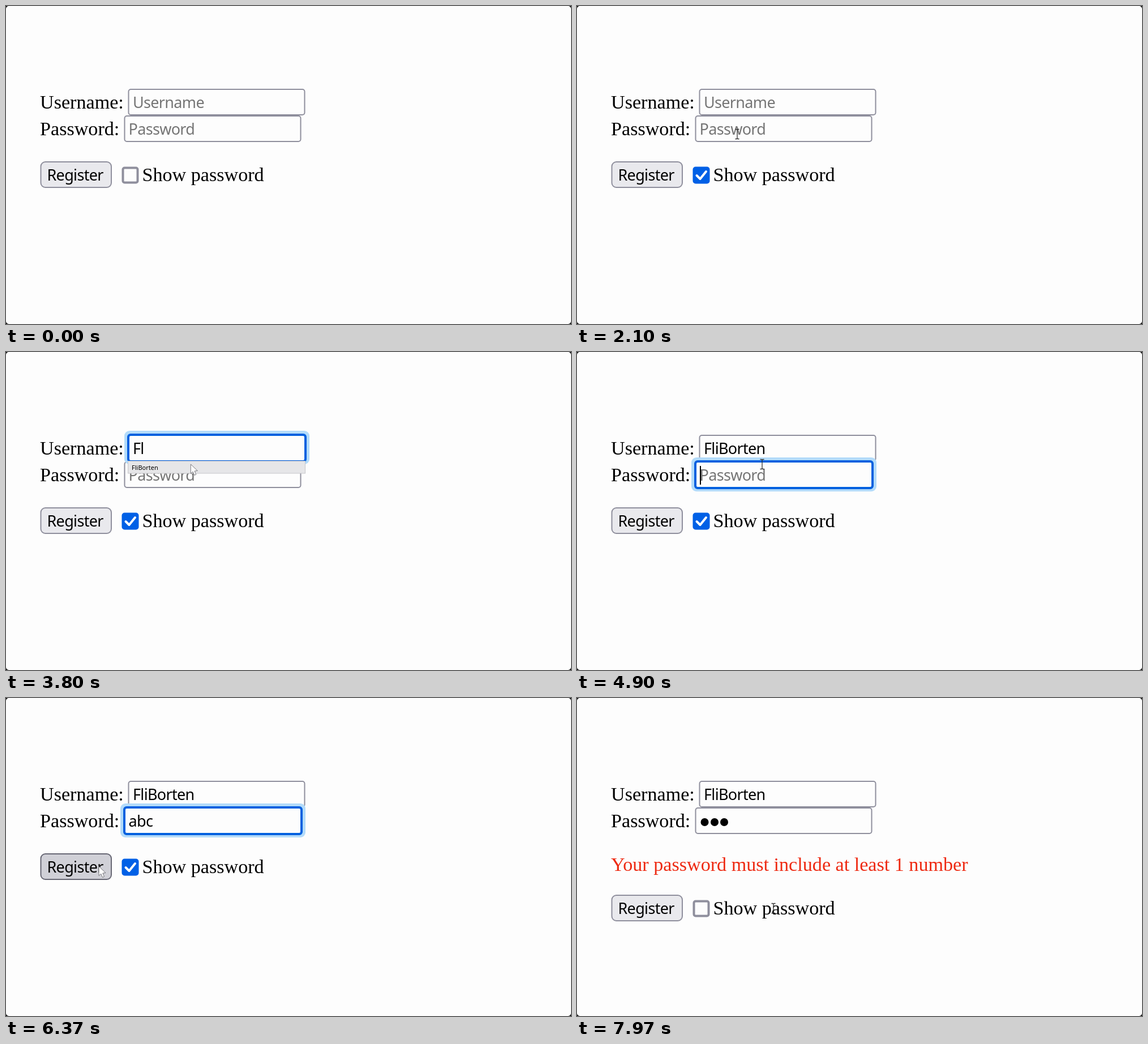
Recreate the animation shown at these times as an HTML page. Size 998x561 px, loop 8 s.

```html
<!DOCTYPE html>
<html lang="en">
<head>
<meta charset="utf-8">
<title>Register form</title>
<style>
  html, body { margin: 0; width: 100%; height: 100%; overflow: hidden; background: #000; }
  svg { display: block; width: 998px; height: 561px; }
  text { white-space: pre; }
  .serif { font: 34.13px "Liberation Serif", serif; }
  .ui { font: 27px "Noto Sans", sans-serif; letter-spacing: -.025em; }
  .small { font: 11px "Noto Sans", sans-serif; }
  .hint { fill: #757575; }
  .error { fill: #ee2a12; }
  .field { fill: #fdfdfd; stroke: #8f8f9d; stroke-width: 2; }
  .halo { fill: #b3dbfa; }
  .ring { fill: #fdfdfd; stroke: #0060df; stroke-width: 4; }
  .button { fill: #e9e9ed; stroke: #8f8f9d; stroke-width: 2; }
  .button.hover { fill: #d0d0d7; stroke: #676774; }
  .button.down { fill: #b1b1b9; stroke: #484851; }
  .box { fill: #fdfdfd; stroke: #8f8f9d; stroke-width: 4; }
  .box.hover { stroke: #676774; }
  .box.on { fill: #0060e6; stroke: #0060e6; }
  .box.on.hover { fill: #0250bb; stroke: #0250bb; }
  .tick { fill: none; stroke: #fff; stroke-width: 4; stroke-linecap: round; stroke-linejoin: round; }
</style>
</head>
<body>
<svg viewBox="0 0 998 561">
  <rect width="998" height="561" rx="5" fill="#fdfdfd"/>
  <text class="serif" x="60" y="181">Username:</text>
  <text class="serif" x="60" y="228">Password:</text>

  <rect class="field" x="216.5" y="147" width="311" height="45" rx="4"/>
  <rect class="field" x="209.5" y="194" width="311" height="45" rx="4"/>
  <g id="userFocus">
    <rect class="halo" x="209" y="139" width="327" height="59" rx="9"/>
    <rect class="ring" x="216" y="146" width="313" height="47" rx="4"/>
  </g>
  <g id="passFocus">
    <rect class="halo" x="202" y="186" width="327" height="60" rx="9"/>
    <rect class="ring" x="209" y="193" width="313" height="47" rx="4"/>
  </g>
  <text id="user" class="ui" x="224" y="180"></text>
  <text id="pass" class="ui" x="216.5" y="227"></text>
  <g id="dots">
    <circle cx="225.5" cy="219" r="7"/><circle cx="243" cy="219" r="7"/><circle cx="260" cy="219" r="7"/>
  </g>
  <rect id="caret" width="2" height="33"/>

  <g id="popup">
    <rect x="215.5" y="192.5" width="313" height="21.5" fill="#e6e6e8" stroke="#c6c6ca"/>
    <text class="small" x="222" y="208">FliBorten</text>
  </g>

  <text id="error" class="serif error" x="60" y="305">Your password must include at least 1 number</text>
  <g id="actions">
    <rect id="button" class="button" x="61.5" y="275" width="124.5" height="45" rx="8"/>
    <text class="ui" x="72.5" y="308">Register</text>
    <rect id="box" class="box" x="206.5" y="285.5" width="26" height="26" rx="3"/>
    <path id="tick" class="tick" d="M211.5 299l6 6 10.5-13"/>
    <text class="serif" x="240.5" y="309">Show password</text>
  </g>

  <path id="arrow" d="M0 0v16.5l3.8-3.4 2.7 6.3 3-1.3-2.7-6.1 5.2-.5z" fill="#fff" stroke="#77777c" stroke-linejoin="round"/>
  <path id="beam" d="M-3.5-8.5h2.5l1 1 1-1h2.500M0-7.500v15M-3.500 8.500h2.500l1-1 1 1h2.500" fill="none" stroke="#333" stroke-width="1.300"/>
</svg>
<script>
  const LOOP = 8000;
  const NAME = "FliBorten";
  const T = { check: 1750, userFocus: 2500, popup: 3030, popupEnd: 4520, passFocus: 4700, press: 6480, submit: 6600 };
  const userKeys = [3000, 3200, 3870, 3980, 4090, 4190, 4300, 4410, 4520];
  const passKeys = [5400, 5570, 5750];

  // time, x, y, pointer shape
  const path = [
    [1100, 254, 408, "arrow"], [1550, 224, 298, "arrow"], [1900, 222, 297, "arrow"],
    [2070, 276, 235, "beam"], [2100, 283, 226, "beam"], [2400, 322, 176, "beam"],
    [3200, 322, 176, "beam"], [3400, 326, 198, "arrow"], [4520, 327, 198, "beam"],
    [5800, 327, 198, "beam"], [5900, 290, 240, "arrow"], [6030, 215, 286, "arrow"],
    [6340, 164, 297, "arrow"], [6600, 164, 297, "beam"], [6830, 128, 305, "beam"],
    [7200, 128, 305, "beam"], [7400, 185, 325, "arrow"], [7730, 300, 358, "beam"],
    [7970, 347, 371, "beam"]
  ];

  const el = {};
  for (const node of document.querySelectorAll("svg [id]")) el[node.id] = node;

  const show = (node, on) => node.setAttribute("visibility", on ? "visible" : "hidden");
  const within = (t, from, to) => t >= from && t < to;
  const typed = (keys, t) => keys.filter(k => k <= t).length;

  function setField(node, value, hint) {
    const text = value || hint;
    if (node.textContent !== text) node.textContent = text;
    node.classList.toggle("hint", !value);
  }

  function pointer(t) {
    if (t < path[0][0]) return null;
    const i = path.findLastIndex(p => p[0] <= t);
    const a = path[i], b = path[i + 1] || a;
    const u = b === a ? 0 : (t - a[0]) / (b[0] - a[0]);
    const e = u * u * (3 - 2 * u);
    return { x: a[1] + (b[1] - a[1]) * e, y: a[2] + (b[2] - a[2]) * e, shape: a[3] };
  }

  function drawCaret(t, onUser, onPass) {
    const field = onUser ? el.user : el.pass;
    const marks = onUser ? [T.userFocus, ...userKeys] : [T.passFocus, ...passKeys];
    const last = marks.filter(k => k <= t).pop();
    const lit = (onUser || onPass) && (t - last) % 1060 < 530;
    show(el.caret, lit);
    if (!lit) return;
    const empty = field.classList.contains("hint");
    const width = empty ? 0 : field.getComputedTextLength();
    el.caret.setAttribute("x", (onUser ? 224 : 217) + width);
    el.caret.setAttribute("y", onUser ? 154 : 201);
  }

  function draw(t) {
    const sent = t >= T.submit;
    const onUser = within(t, T.userFocus, T.passFocus);
    const onPass = within(t, T.passFocus, T.submit);
    const checked = within(t, T.check, T.submit);

    setField(el.user, NAME.slice(0, typed(userKeys, t)), "Username");
    setField(el.pass, "abc".slice(0, typed(passKeys, t)), "Password");
    show(el.userFocus, onUser);
    show(el.passFocus, onPass);
    show(el.pass, !sent);
    show(el.dots, sent);
    show(el.error, sent);
    show(el.popup, within(t, T.popup, T.popupEnd));
    show(el.tick, checked);
    el.actions.setAttribute("transform", `translate(0 ${sent ? 73 : 0})`);
    drawCaret(t, onUser, onPass);

    const p = pointer(t);
    const shift = sent ? 73 : 0;
    const over = (x, y, w, h) => !!p && within(p.x, x, x + w) && within(p.y - shift, y, y + h);
    el.button.classList.toggle("hover", over(61, 274, 126, 47));
    el.button.classList.toggle("down", within(t, T.press, T.submit));
    el.box.classList.toggle("hover", over(204, 283, 31, 31));
    el.box.classList.toggle("on", checked);
    for (const shape of ["arrow", "beam"]) {
      show(el[shape], p && p.shape === shape);
      if (p) el[shape].setAttribute("transform", `translate(${p.x} ${p.y})`);
    }
  }

  const start = performance.now();
  function tick(now) {
    draw(Math.max(0, now - start) % LOOP);
    requestAnimationFrame(tick);
  }
  draw(0);
  requestAnimationFrame(tick);
</script>
</body>
</html>
```
